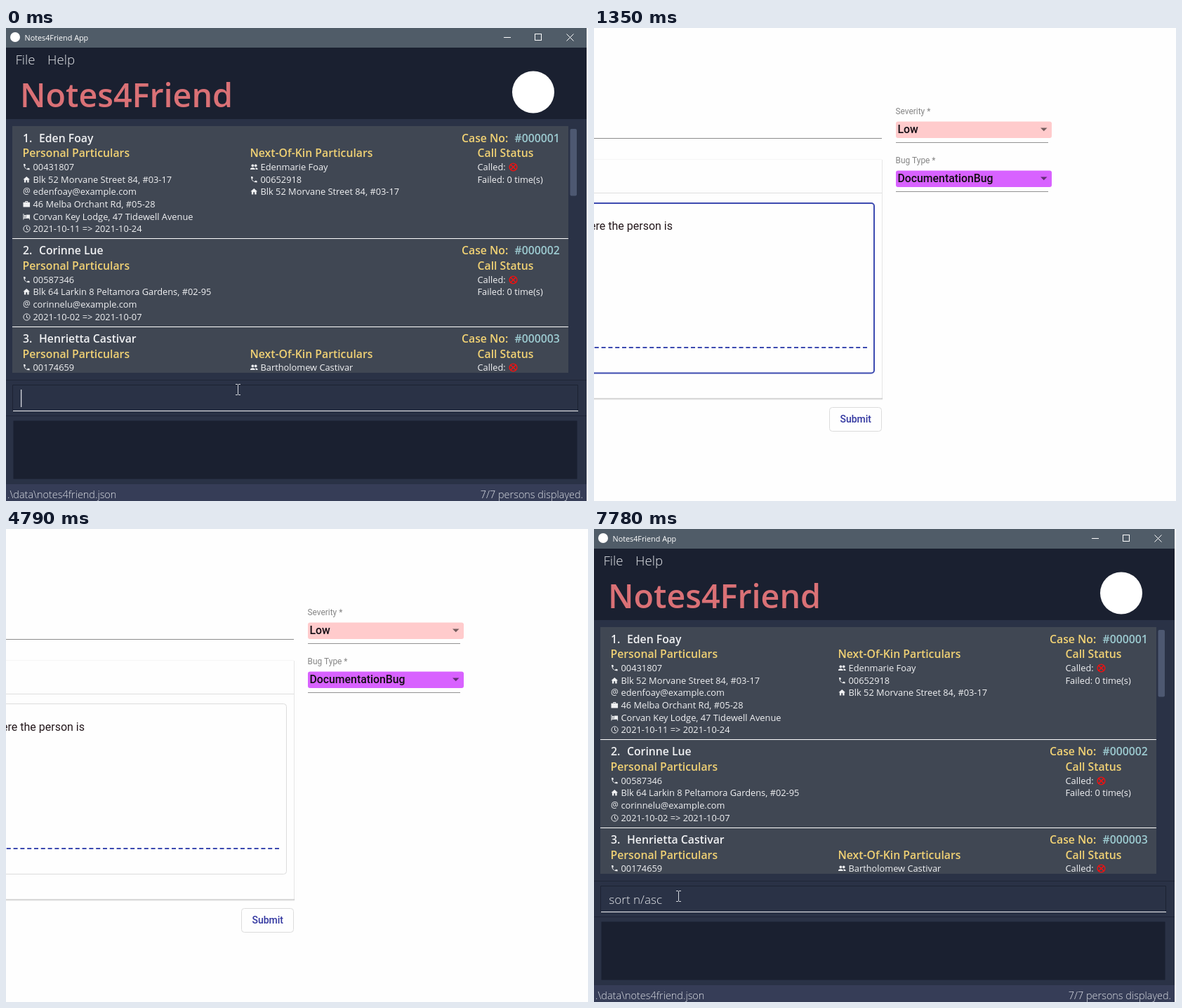
These frames come from a looping animation (829x675 px, 8000 ms). An HTML page with a canvas:

```html
<!DOCTYPE html>
<html lang="en">
<head>
<meta charset="utf-8">
<title>Notes4Friend App</title>
<style>
  html, body { margin: 0; width: 100%; height: 100%; overflow: hidden; background: #fff; }
  canvas { display: block; }
</style>
</head>
<body>
<canvas id="stage" width="829" height="675"></canvas>
<script>
const ctx = document.getElementById('stage').getContext('2d');
const LOOP = 8000;
const SANS = '"Open Sans", "Noto Sans", sans-serif';
const ROBOTO = 'Roboto, Arial, sans-serif';
const GOLD = '#f0d174', TEAL = '#9dcbd1', PALE = '#f0f1f3';
const HEAD = 15.78, ROW = 12.82;

const persons = [
  {
    top: 145.5, name: 'Eden Foay',
    own: [['phone', '00431807'], ['home', 'Blk 52 Morvane Street 84, #03-17'],
      ['mail', 'edenfoay@example.com'], ['work', '46 Melba Orchant Rd, #05-28'],
      ['bed', 'Corvan Key Lodge, 47 Tidewell Avenue'], ['clock', '2021-10-11 => 2021-10-24']],
    kin: [['people', 'Edenmarie Foay'], ['phone', '00652918'],
      ['home', 'Blk 52 Morvane Street 84, #03-17']]
  },
  {
    top: 306.3, name: 'Corinne Lue',
    own: [['phone', '00587346'], ['home', 'Blk 64 Larkin 8 Peltamora Gardens, #02-95'],
      ['mail', 'corinnelu@example.com'], ['clock', '2021-10-02 => 2021-10-07']]
  },
  {
    top: 431.9, name: 'Henrietta Castivar',
    own: [['phone', '00174659']],
    kin: [['people', 'Bartholomew Castivar']]
  }
];

// Icons on a 24-unit grid
const icons = {
  phone: 'M3 3h5l1 5-3 3q3 5 7 7l3-3 5 1v5Q4 21 3 3z',
  home: 'M10 21v-7h4v7h5v-9h3L12 3 2 12h3v9z',
  work: 'M2 7h6V3h8v4h6v14H2zM10 5h4v2h-4z',
  bed: 'M2 3h2v11h7V6h11v15h-2v-4H4v4H2zM7.5 7a3 3 0 1 0 .1 0z',
  people: 'M8 4a4 4 0 1 0 .1 0zM17 4a4 4 0 1 0 .1 0zM1 20v-3q7-6 14 0v3zM17 20v-4l-1-2q4 0 7 3v3z'
};
for (const key in icons) icons[key] = new Path2D(icons[key]);

function rect(x, y, w, h, color) {
  ctx.fillStyle = color;
  ctx.fillRect(x, y, w, h);
}

function round(x, y, w, h, r, fill, stroke, width = 1) {
  ctx.beginPath();
  ctx.roundRect(x, y, w, h, r);
  if (fill) { ctx.fillStyle = fill; ctx.fill(); }
  if (stroke) { ctx.strokeStyle = stroke; ctx.lineWidth = width; ctx.stroke(); }
}

function disc(x, y, r, color) {
  ctx.beginPath();
  ctx.arc(x, y, r, 0, Math.PI * 2);
  ctx.fillStyle = color;
  ctx.fill();
}

function line(points, color, width = 1) {
  ctx.beginPath();
  points.forEach(([x, y]) => ctx.lineTo(x, y));
  ctx.strokeStyle = color;
  ctx.lineWidth = width;
  ctx.stroke();
}

function text(str, x, y, size, color, weight = 400, align = 'left', family = SANS) {
  ctx.font = `${weight} ${size}px ${family}`;
  ctx.textAlign = align;
  ctx.fillStyle = color;
  ctx.fillText(str, x, y);
}

function icon(kind, x, y) {
  if (kind === 'mail') return text('@', x, y + 9, 12, PALE);
  if (kind === 'clock') {
    ctx.beginPath();
    ctx.arc(x + 5.5, y + 5.5, 4.6, 0, Math.PI * 2);
    ctx.strokeStyle = PALE;
    ctx.lineWidth = 1;
    ctx.stroke();
    return line([[x + 5.5, y + 2.5], [x + 5.5, y + 6], [x + 8, y + 7.3]], PALE);
  }
  ctx.save();
  ctx.translate(x - 0.5, y - 0.5);
  ctx.scale(0.48, 0.48);
  ctx.fillStyle = PALE;
  ctx.fill(icons[kind], 'evenodd');
  ctx.restore();
}

function cross(x, y) {
  const red = '#f5100f', d = 3.8;
  ctx.beginPath();
  ctx.arc(x, y, 5.4, 0, Math.PI * 2);
  ctx.strokeStyle = red;
  ctx.lineWidth = 1.3;
  ctx.stroke();
  line([[x - d, y - d], [x + d, y + d]], red, 1.5);
  line([[x + d, y - d], [x - d, y + d]], red, 1.5);
}

function drawPerson({ top, name, own, kin }, i) {
  const first = Math.round(top + 17.1), second = Math.round(top + 38.8);
  const row = n => Math.round(top + 57.4 + n * 17.7);
  const head = (str, x, y, color = GOLD) => text(str, x, y, HEAD, color, 600);
  const rows = (list, x) => list.forEach(([kind, str], n) => {
    icon(kind, x, row(n) - 10);
    text(str, x + 14.5, row(n), ROW, PALE);
  });

  head(i + 1 + '.', 24, first, PALE);
  head(name, 47, first, PALE);
  head('Case No:', 649, first);
  head('#00000' + (i + 1), 724.5, first, TEAL);
  head('Personal Particulars', 23.5, second);
  rows(own, 24);
  if (kin) {
    head('Next-Of-Kin Particulars', 347.5, second);
    rows(kin, 348);
  }
  head('Call Status', 671.5, second);
  text('Called:', 671.5, row(0), ROW, PALE);
  cross(722.5, row(0) - 4.5);
  text('Failed: 0 time(s)', 671.5, row(1), ROW, PALE);
}

function drawApp() {
  rect(0, 0, 829, 675, '#2a3246');

  // Title bar
  rect(0, 0, 829, 28, '#505c68');
  disc(13, 13, 7, '#fff');
  text('Notes4Friend App', 26.5, 17.5, 10.8, '#fff');
  line([[709, 13.5], [719, 13.5]], '#fff');
  ctx.strokeRect(753.5, 8.5, 9, 9);
  line([[798.5, 8.5], [808.5, 18.5]], '#fff');
  line([[808.5, 8.5], [798.5, 18.5]], '#fff');

  // Header
  rect(0, 28, 829, 102, '#1a2030');
  text('File', 13.5, 52, 18.67, '#e6e8ec', 300);
  text('Help', 59, 52, 18.67, '#e6e8ec', 300);
  text('Notes4Friend', 20, 113, 46.67, '#da7176', 600);
  disc(751, 91.5, 30, '#fff');

  // Person list
  rect(9, 140, 792, 352, '#404753');
  ctx.save();
  ctx.beginPath();
  ctx.rect(9, 140, 792, 352);
  ctx.clip();
  persons.forEach(drawPerson);
  rect(9, 300, 792, 1, '#fff');
  rect(9, 426, 792, 1, '#fff');
  ctx.restore();
  round(803.5, 144, 9.5, 95.5, 2, '#4d5871');

  // Command box
  rect(0, 502, 829, 1, '#1f2637');
  round(9.5, 509.5, 805, 37, 0, null, '#1c2232');
  rect(10, 546, 805, 1, '#f2f3f5');

  // Result box and status bar
  rect(0, 553, 829, 1, '#1f2637');
  round(10.5, 560.5, 803, 83, 1, '#1a2030', '#20273a');
  rect(0, 651, 829, 24, '#363d57');
  text('.\\data\\notes4friend.json', 2, 671, 14.45, '#dde0e6', 300);
  text('7/7 persons displayed.', 822, 671, 14.45, '#dde0e6', 300, 'right');

  rect(827, 0, 2, 675, '#f4f4f5');
}

function select(label, value, y, fill) {
  text(label, 429.5, y - 10.5, 11.9, '#858585', 400, 'left', ROBOTO);
  round(430, y, 222, 23.5, 3, fill);
  text(value, 432.5, y + 16.5, 15.8, '#130d14', 500, 'left', ROBOTO);
  ctx.beginPath();
  ctx.moveTo(636, y + 9);
  ctx.lineTo(645.5, y + 9);
  ctx.lineTo(640.75, y + 13.8);
  ctx.fillStyle = 'rgba(0,0,0,.54)';
  ctx.fill();
  rect(430, y + 29.5, 217, 1, '#929292');
}

function drawForm(focused) {
  const blue = '#3c4ab0';
  rect(0, 0, 829, 675, '#fefefe');
  rect(0, 157, 410, 1, '#8c8c8c');
  select('Severity *', 'Low', 133.5, '#ffcbcc');
  select('Bug Type *', 'DocumentationBug', 203.5, '#d862ff');

  // Editor card
  rect(0, 187, 410, 1, '#f6f6f6');
  rect(410, 188, 1, 341, '#e6e6e6');
  rect(0, 235, 410, 1, '#dedede');
  rect(0, 528.5, 411, 1, '#b0b0b0');
  rect(0, 529.5, 411, 1, '#e4e4e4');
  if (focused) round(-20, 250, 419, 242.5, 4, null, blue, 2);
  else round(-20, 249.5, 419.5, 243, 4, null, '#dcdcdc');
  text('where the person is', 112, 287.5, 16, '#24181c', 400, 'right', ROBOTO);
  ctx.setLineDash([6, 3.8]);
  line([[389, 456], [0, 456]], blue, 2);
  ctx.setLineDash([]);

  round(335.5, 541.5, 74, 34, 4, null, '#dcdcdc');
  text('Submit', 372.7, 562.5, 14, '#3237a0', 500, 'center', ROBOTO);
}

function beam(x, y) {
  const c = '#d5d8de';
  rect(x - 0.5, y - 6.5, 1, 14, c);
  for (const dy of [-7.5, 7.5]) {
    rect(x - 3.5, y + dy, 3, 1, c);
    rect(x + 0.5, y + dy, 3, 1, c);
  }
}

function arrow(x, y) {
  ctx.beginPath();
  ctx.moveTo(x, y);
  for (const [dx, dy] of [[0, 16], [3.7, 12.5], [6.3, 18], [8.6, 17], [6.1, 11.5], [11, 11.2]])
    ctx.lineTo(x + dx, y + dy);
  ctx.closePath();
  ctx.fillStyle = '#fff';
  ctx.fill();
  ctx.strokeStyle = '#000';
  ctx.lineWidth = 1;
  ctx.stroke();
}

// Pointer glide between two points in discrete steps
function glide(t, start, end, steps, from, to) {
  const k = Math.floor((t - start) / (end - start) * (steps - 1) + 0.001) + 1;
  const p = Math.min(1, k / steps);
  const e = p * (2 - p);
  return from.map((v, i) => Math.round(v + (to[i] - v) * e) + 0.5);
}

function pointerAt(t) {
  if (t < 550) return [330.5, 515.5];
  if (t < 620) return [329.5, 500.5];
  if (t < 5380) return null;
  if (t < 6570) return glide(t, 5380, 5650, 5, [174, 684], [152, 533]);
  return glide(t, 6570, 7120, 8, [152, 533], [120, 523]);
}

const within = (t, spans) => spans.some(([a, b]) => t >= a && t < b);
const caretOn = [[0, 550], [1020, 1350], [4920, 5415], [5910, 6810], [7320, 7780]];

function draw(t) {
  if (t >= 1350 && t < 4920) {
    drawForm(t < 4790);
    if (t >= 3200 && t < 3270) arrow(47.5, 649.5);
    return;
  }
  drawApp();
  const typed = t >= 6310;
  if (typed) text('sort n/asc', 21.3, 535, 17.07, '#e6e8ec', 300);
  if (within(t, caretOn)) rect(typed ? 96.5 : 21, 516, 1.3, 25, '#d5d8de');
  const pointer = pointerAt(t);
  if (pointer) beam(...pointer);
}

function tick() {
  draw(performance.now() % LOOP);
  requestAnimationFrame(tick);
}
tick();
</script>
</body>
</html>
```
